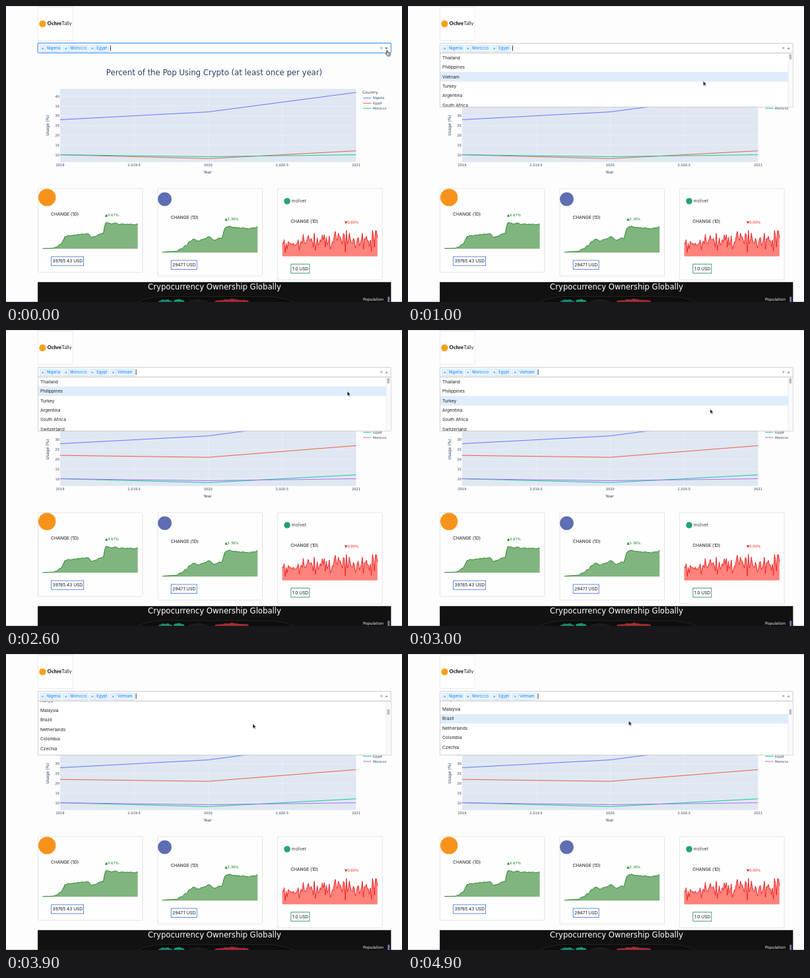
Recreate the animation shown at these times as an HTML page. Size 600x449 px, loop 5 s.

```html
<!DOCTYPE html>
<html lang="en">
<head>
<meta charset="utf-8">
<title>Crypto dashboard</title>
<style>
html, body { margin: 0; width: 100%; height: 100%; overflow: hidden; background: #fdfdfd; }
svg { display: block; width: 600px; height: 449px; }
text { font-family: Inter, "Liberation Sans", sans-serif; }
.dj { font-family: "DejaVu Sans", sans-serif; }
.la { font-family: Lato, sans-serif; }
.mid { text-anchor: middle; }
.end { text-anchor: end; }

.t { animation: 5s step-end infinite; }
.chart1 { animation-name: chart1; }
.chart2 { animation-name: chart2; }
.picked { animation-name: picked; }
.caret { animation-name: caret; }
.menu1 { animation-name: menu1; }
.menu2 { animation-name: menu2; }
.open { animation-name: open; }
.closed { animation-name: closed; }
.row1 { animation-name: row1; }
.row2 { animation-name: row2; }
.hand { animation-name: hand; }
.beam { animation-name: beam; }
.arrow { animation-name: arrow; }
.scroll { animation: scroll 5s infinite; }
.thumb { animation: thumb 5s infinite; }
.cursor { animation: cursor 5s infinite; }

@keyframes chart1 { 0% { opacity: 1 } 30%, 100% { opacity: 0 } }
@keyframes chart2 { 0% { opacity: 0 } 30%, 100% { opacity: 1 } }
@keyframes picked { 0% { opacity: 0 } 26%, 100% { opacity: 1 } }
@keyframes caret { 0% { transform: none } 26%, 100% { transform: translateX(38.6px) } }
@keyframes menu1 { 0% { opacity: 0 } 6% { opacity: 1 } 26%, 100% { opacity: 0 } }
@keyframes menu2 { 0% { opacity: 0 } 44%, 100% { opacity: 1 } }
@keyframes open { 0% { opacity: 0 } 6% { opacity: 1 } 26% { opacity: 0 } 44%, 100% { opacity: 1 } }
@keyframes closed { 0% { opacity: 1 } 6% { opacity: 0 } 26% { opacity: 1 } 44%, 100% { opacity: 0 } }
@keyframes hand { 0% { opacity: 1 } 8% { opacity: 0 } 42% { opacity: 1 } 46%, 100% { opacity: 0 } }
@keyframes beam { 0% { opacity: 0 } 36% { opacity: 1 } 42%, 100% { opacity: 0 } }
@keyframes arrow { 0% { opacity: 0 } 8% { opacity: 1 } 36% { opacity: 0 } 46%, 100% { opacity: 1 } }
@keyframes row1 { 0% { --row: 0 } 12% { --row: 1 } 16%, 100% { --row: 2 } }
@keyframes row2 { 0% { --row: 0 } 52% { --row: 1 } 56% { --row: 2 } 64% { --row: 4 } 82%, 100% { --row: 9 } }
.row1, .row2 { transform: translateY(calc(var(--row, 0) * 14.45px)); }
@keyframes scroll {
  0%, 62% { transform: none; animation-timing-function: steps(2) }
  66% { transform: translateY(-4px); animation-timing-function: steps(6) }
  78% { transform: translateY(-108.5px); animation-timing-function: steps(2) }
  82%, 100% { transform: translateY(-110.3px) }
}
@keyframes thumb {
  0%, 66% { transform: none; animation-timing-function: steps(6) }
  78%, 100% { transform: translateY(10.8px) }
}
@keyframes cursor {
  0%, 6% { transform: translate(577.5px, 67.5px); animation-timing-function: steps(7) }
  20%, 26% { transform: translate(447.3px, 113.7px); animation-timing-function: steps(6) }
  38% { transform: translate(553.3px, 61.7px); animation-timing-function: steps(3) }
  44% { transform: translate(576.5px, 66px); animation-timing-function: steps(8) }
  60% { transform: translate(457.7px, 119.7px); animation-timing-function: steps(3) }
  66% { transform: translate(391.5px, 123.3px); animation-timing-function: steps(6) }
  78% { transform: translate(374px, 105.7px); animation-timing-function: steps(10) }
  98%, 100% { transform: translate(334.4px, 101.3px) }
}
</style>
</head>
<body>
<svg id="stage" viewBox="0 0 600 449" xmlns="http://www.w3.org/2000/svg"></svg>
<script>
const INK = '#2a3f5f', GREEN = '#1f7f22', RED = '#ee1c1c';
const SERIES = ['#636efa', '#ef553b', '#00cc96', '#ab63fa'];
const USAGE = {
  Nigeria: [28, 32, 42], Vietnam: [22, 21, 27],
  Egypt: [10, 8, 12], Morocco: [10, 9, 10]
};
const ROW = 14.45, TOP = 71.2;

const rect = (x, y, w, h, fill, extra = '') =>
  `<rect x="${x}" y="${y}" width="${w}" height="${h}" fill="${fill}" ${extra}/>`;
const text = (x, y, str, size, fill, cls = '', extra = '') =>
  `<text x="${x}" y="${y}" font-size="${size}" fill="${fill}" class="${cls}" ${extra}>${str}</text>`;
const path = (d, fill, stroke = 'none', width = 1) =>
  `<path d="${d}" fill="${fill}" stroke="${stroke}" stroke-width="${width}" stroke-linejoin="round"/>`;
const dot = (x, y, r, fill) => `<circle cx="${x}" cy="${y}" r="${r}" fill="${fill}"/>`;
const group = (cls, ...parts) => `<g class="${cls}">${parts.join('')}</g>`;

let seed = 7;
const rand = () => (seed = seed * 16807 % 2147483647) / 2147483647;
const noise = size => (rand() - rand()) * size;

function header() {
  return rect(0, 0, 600, .7, '#d4d4d8') +
    rect(48.5, 1.5, 52.5, 51, '#fff', 'stroke="#dee2e6" stroke-width=".7"') +
    dot(55.4, 27, 5.2, '#f9a11b') +
    text(62.6, 29.4, '<tspan font-weight="900">Ochre</tspan>Tally', 7.8, '#222', 'la');
}

const px = i => 82 + 224.2 * i;
const py = v => 225.6 - (v - 10) * 2.952;

function axes() {
  let s = text(315.5, 105, 'Percent of the Pop Using Crypto (at least once per year)', 11.7, INK, 'dj mid') +
    rect(82, 125.6, 448.5, 111, '#dfe7f2');
  for (let v = 10; v <= 40; v += 5)
    s += rect(82, py(v) - .25, 448.5, .5, '#f0f4fa') + text(81, py(v) + 1.9, v, 5.1, INK, 'dj end');
  ['2019', '2,019.5', '2020', '2,020.5', '2021'].forEach((label, i) => {
    s += rect(px(i / 2) - .25, 125.6, .5, 111, '#f0f4fa') + text(px(i / 2), 242.9, label, 5.1, INK, 'dj mid');
  });
  return s + text(305.5, 253.8, 'Year', 5.9, INK, 'dj mid') +
    text(0, 0, 'Usage (%)', 6.1, INK, 'dj mid', 'transform="translate(65.2 181) rotate(-90)"') +
    text(540, 133.2, 'Country', 5.9, INK, 'dj');
}

function lines(names) {
  return names.map((name, i) => {
    const d = 'M' + USAGE[name].map((v, k) => `${px(k)} ${py(v)}`).join('L');
    const y = 139.6 + i * 7.8;
    return path(d, 'none', SERIES[i], .95) + path(`M541 ${y}h12.5`, 'none', SERIES[i], .95) +
      text(556, y + 1.8, name, 4.85, INK, 'dj');
  }).join('');
}

// Price curve: straight runs between [position, height] keys, plus a small jitter.
function price(keys) {
  return Array.from({ length: 73 }, (_, i) => {
    const x = i / 72;
    const k = Math.max(1, keys.findIndex(key => key[0] >= x));
    const [x0, h0] = keys[k - 1], [x1, h1] = keys[k];
    return h0 + (h1 - h0) * (x - x0) / (x1 - x0) + (x > .15 ? noise(1.5) : 0);
  });
}

// Flat-pegged price: spikes that grow a little towards the end.
const pegged = () => Array.from({ length: 96 }, (_, i) =>
  Math.min(40, Math.max(2, 19 + i * .05 + noise(19))));

function area(x, base, heights, fill, stroke) {
  const step = 144.3 / (heights.length - 1);
  const d = 'M' + heights.map((h, i) => `${x + i * step} ${base - h}`).join('L');
  return path(`${d}V${base}H${x}Z`, fill) + path(d, 'none', stroke, .95);
}

function card(i, change, value, boxW, edge, color, fill, heights) {
  const x = 48.4 + i * 181.6, dy = i * 5.7;
  return rect(x, 277, 158.5, 127 + dy, '#fefefe', 'rx="1.5" stroke="#dcdcde" stroke-width=".8"') +
    text(x + 19.7, 317.6 + dy, 'CHANGE (1D)', 6.55, '#151515') +
    text(x + 101.5, 318.9 + dy, change, 5.3, color, 'dj') +
    rect(x + 20.2, 380.2 + dy, boxW, 13.6, '#fff', `stroke="${edge}" stroke-width=".9"`) +
    text(x + 22.2, 389.4 + dy, value, 6.6, '#151515') +
    area(x + 6.9, 368.3 + dy, heights, fill, color);
}

function cards() {
  const coin1 = [[0, .6], [.12, 1], [.2, 8], [.24, 19], [.47, 23], [.52, 17], [.64, 24], [.66, 39.5], [.92, 36.5], [1, 38.5]];
  const coin2 = [[0, .6], [.14, 2], [.22, 8], [.33, 21], [.37, 17], [.5, 24], [.54, 18], [.63, 23], [.66, 39.5], [.9, 36.5], [1, 38.5]];
  const soft = '#80b57f', blue = '#4a7fe0';
  return card(0, '▲4.67%', '39765.43 USD', 49, blue, GREEN, soft, price(coin1)) +
    card(1, '▲5.36%', '2947.1 USD', 39, blue, GREEN, soft, price(coin2)) +
    card(2, '▼0.00%', '1.0 USD', 28, '#2f9478', RED, '#ff827c', pegged()) +
    dot(62.2, 290.4, 13.2, '#f7931a') + dot(240.5, 293, 10.5, '#5f6db3') + dot(426, 296, 4.8, '#26a17b') +
    text(432.5, 298.4, 'molvet', 7.1, '#444');
}

// A coast with a ragged upper edge, cut off by the window.
function land(x0, x1, y, fill) {
  let d = `M${x0} 449`;
  for (let x = x0; x <= x1; x += 3)
    d += `L${x} ${y + 3 * Math.abs(2 * (x - x0) / (x1 - x0) - 1) + noise(1.5)}`;
  return path(d + `L${x1} 449Z`, fill, '#111', .5);
}

function world() {
  return rect(0, 447.8, 600, 1.2, '#d2d2d6') +
    rect(48.1, 418.8, 535.3, 30.2, '#111') +
    text(316, 429.9, 'Crypocurrency Ownership Globally', 11.65, '#fff', 'dj mid') +
    path('M199 449Q214 441.5 238 440.5H394Q420 441.5 437 449', '#0d0d0d', '#333', .6) +
    land(231, 252, 444.5, '#1c8f6c') + land(254, 271, 443.5, '#1c9a74') +
    land(276, 306, 444.5, '#1d1d1d') + land(316, 368, 444, '#a82e36') +
    text(541, 446.9, 'Population', 5.9, '#f2f2f2', 'dj') +
    rect(578.3, 441, 3, 8, '#6a78a4');
}

function tag(x, w, name) {
  return rect(x, 59.2, w, 10.2, '#ebf5ff', 'rx=".9" stroke="#bcdcfc" stroke-width=".7"') +
    path(`M${x + 8} 59.2v10.2`, 'none', '#bcdcfc', .7) +
    text(x + 4, 66.1, '×', 6.4, '#007eff', 'mid') +
    text(x + 10.4, 66.4, name, 5.95, '#007eff');
}

function control() {
  return group('t closed',
      rect(47.6, 55.8, 536, 15.8, 'none', 'rx="2" stroke="#d4e8fc" stroke-width="2"'),
      rect(48.4, 56.4, 534.8, 14.6, '#fff', 'rx="1.6" stroke="#2a8cf0" stroke-width=".9"'),
      path('M574.4 63h4.4l-2.2 2.4z', '#8a4b4b')) +
    group('t open',
      rect(48.4, 56.4, 534.8, 14.8, '#fff', 'rx="1.6" stroke="#bbb" stroke-width=".8"'),
      path('M574.4 65.2h4.4l-2.2-2.4z', '#888')) +
    text(568.8, 66.2, '×', 7.5, '#777', 'mid') +
    tag(51.5, 32.6, 'Nigeria') + tag(86.9, 37.3, 'Morocco') + tag(126.8, 29.2, 'Egypt') +
    group('t picked', tag(158.4, 36.4, 'Vietnam')) +
    group('t caret', rect(158, 60, .9, 8, '#222'));
}

function menu(cls, rowCls, bodyCls, thumbCls, items) {
  const rows = items.map((name, i) => text(52, TOP + i * ROW + 9.4, name, 6.65, '#222')).join('');
  return group('t ' + cls,
    rect(48.4, 71.2, 534.8, 82, '#fff', 'stroke="#c4c4c4" stroke-width=".8"'),
    `<g clip-path="url(#list)">${group(bodyCls,
      group('t ' + rowCls, rect(48.8, TOP, 527.4, ROW, '#deecfb')), rows)}</g>`,
    rect(576, 71.6, 6.8, 81.2, '#fafafa'),
    path('M576 71.6v81.2', 'none', '#e4e4e4', .6),
    group(thumbCls, rect(577.6, 72.8, 3.6, 8.8, '#bdbdbd', 'rx="1.8"')));
}

function pointer() {
  const bar = 'M-1.6-3.8Q0-3.8 0-2.8Q0-3.8 1.6-3.8M0-2.8V2.8M-1.6 3.8Q0 3.8 0 2.8Q0 3.8 1.6 3.8M-.7 1h1.4';
  return group('cursor',
    group('t arrow', path('M0 0V7.2L1.7 5.7 2.8 8.2 3.9 7.7 2.8 5.3H5Z', '#111', '#fff', .5)),
    group('t beam', path(bar, 'none', '#222', .9)),
    group('t hand', path('M-.8.2Q0-.8.8.2V3L4 3.7Q4.8 4 4.6 5L4 8.3H.3L-2 5.2Q-2 4-.8 4.8Z', '#f4f4f4', '#222', .9),
      path('M1.2 5v2M2.7 5v2', 'none', '#222', .5)));
}

const before = ['Thailand', 'Philippines', 'Vietnam', 'Turkey', 'Argentina', 'South Africa'];
const after = [...before.filter(name => name !== 'Vietnam'), 'Switzerland', 'Indonesia',
  'Kenya', 'Malaysia', 'Brazil', 'Netherlands', 'Colombia', 'Czechia', 'Peru'];

document.getElementById('stage').innerHTML =
  '<clipPath id="list"><rect x="48.8" y="71.6" width="527.4" height="81.2"/></clipPath>' +
  header() + axes() +
  group('t chart1', lines(['Nigeria', 'Egypt', 'Morocco'])) +
  group('t chart2', lines(['Nigeria', 'Vietnam', 'Egypt', 'Morocco'])) +
  cards() + world() +
  menu('menu1', 'row1', '', '', before) +
  menu('menu2', 'row2', 'scroll', 'thumb', after) +
  control() + pointer();
</script>
</body>
</html>
```
